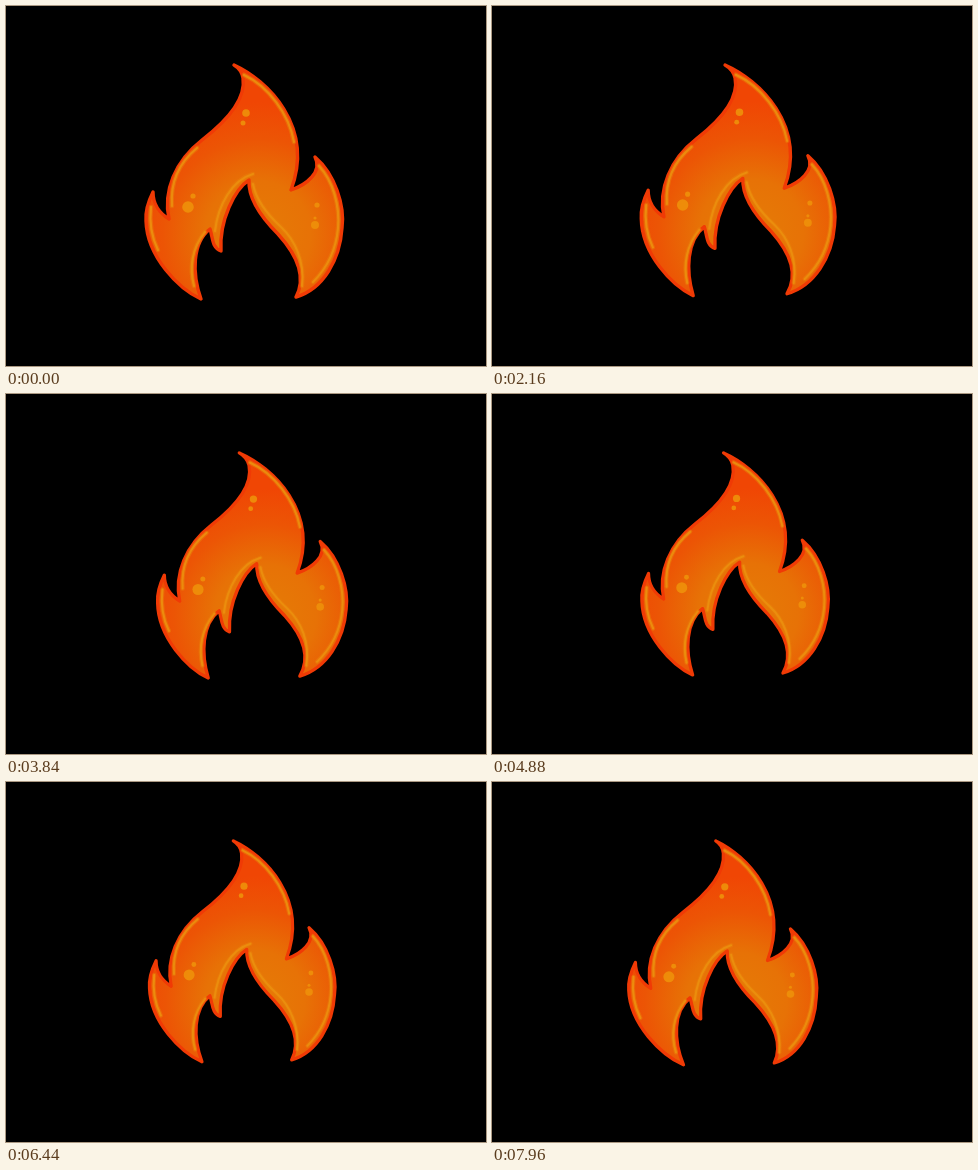
These frames come from a looping animation (480x360 px, 8000 ms). An HTML page:

```html
<!DOCTYPE html>
<html lang="en">
<head>
<meta charset="utf-8">
<title>Flame</title>
<style>
  html, body { margin: 0; width: 100%; height: 100%; overflow: hidden; background: #000; }
  svg { display: block; width: 100vw; height: 100vh; }
  path { fill: none; stroke-linecap: round; stroke-linejoin: round; }
</style>
</head>
<body>
<svg viewBox="0 0 480 360">
  <defs>
    <radialGradient id="heat" gradientUnits="userSpaceOnUse" cx="252" cy="228" r="132">
      <stop offset="0" stop-color="#e57c06"/>
      <stop offset=".4" stop-color="#e77206"/>
      <stop offset=".72" stop-color="#ec5505"/>
      <stop offset="1" stop-color="#f04604"/>
    </radialGradient>
  </defs>
  <g id="flame"></g>
</svg>
<script>
const LOOP = 8000, CX = 238, TOP = 57;
const flame = document.getElementById('flame');
const heat = document.getElementById('heat');

const BODY = `M228 59 C261 74 309 120 285 184 C300 179 317 166 309 151
  C329 168 339 200 336 222 C334 254 317 283 290 291 C300 272 292 250 272 228
  C255 211 242 192 243 174 C229 183 213 214 215 245 C206 242 207 232 204 223
  C186 237 186 268 195 293 C173 283 141 251 140 215 C139 203 143 194 147 186
  C147 197 153 207 163 213 C157 185 169 155 196 134 C222 114 240 92 237 72
  C236 66 233 62 228 59 Z`;

const GLOWS = [
  'M238 69 C262 80 283 108 288 136',
  'M166 200 C164 174 174 156 191 142',
  'M145 201 C143 218 146 232 152 244',
  'M188 280 C183 262 186 242 199 226',
  'M209 225 C212 199 226 174 247 168',
  'M247 178 C250 194 263 210 275 221 C289 234 299 256 296 280',
  'M313 160 C327 175 334 200 332 222 C330 245 321 262 307 276'
];

const DOTS = [
  [240, 107, 3.8], [237, 117, 2.5],
  [182, 201, 5.8], [187, 190, 2.6],
  [311, 199, 2.6], [309, 212, 1.6], [309, 219, 4]
];

// time, sideways sway, scale
const KEYS = [
  [0, 0, 1], [1000, 4.5, .995], [2160, 7.9, .986], [3840, 7.9, .962],
  [4880, 4.9, .949], [6440, -2, .944], [7960, -7.5, .957]
];

function add(tag, attrs) {
  const el = document.createElementNS('http://www.w3.org/2000/svg', tag);
  for (const name in attrs) el.setAttribute(name, attrs[name]);
  return flame.appendChild(el);
}

const paths = [];
function addPath(d, attrs) {
  paths.push({ d, el: add('path', attrs) });
}

addPath(BODY, { style: 'fill:url(#heat)', stroke: '#f03a05', 'stroke-width': 3.4 });
for (const d of GLOWS) {
  addPath(d, { stroke: '#ea800a', 'stroke-width': 4.5, opacity: .5 });
  addPath(d, { stroke: '#ec900e', 'stroke-width': 2.2, opacity: .9 });
}
const dots = DOTS.map(([x, y, r]) => ({
  x, y, el: add('circle', { cy: y, r, fill: '#ee8f0a', opacity: .92 })
}));

function slope(i, c) {
  const a = KEYS[Math.max(i - 1, 0)], b = KEYS[Math.min(i + 1, KEYS.length - 1)];
  return (b[c] - a[c]) / (b[0] - a[0]);
}

// smooth cubic through the keys
function sample(t, c) {
  let i = 0;
  while (i < KEYS.length - 2 && t > KEYS[i + 1][0]) i++;
  const a = KEYS[i], b = KEYS[i + 1], span = b[0] - a[0];
  const u = (t - a[0]) / span, v = 1 - u;
  return a[c] * v * v * (1 + 2 * u) + b[c] * u * u * (1 + 2 * v)
    + span * u * v * (slope(i, c) * v - slope(i + 1, c) * u);
}

// the middle sways more than the tip and the feet
const bend = y => 1 - .31 * ((y - 180) / 115) ** 4;

function draw(t) {
  const scale = sample(t, 2), sway = sample(t, 1) / scale;
  const warp = (x, y) => x + sway * bend(y);
  flame.setAttribute('transform',
    `translate(${CX} ${TOP}) scale(${scale}) translate(${-CX} ${-TOP})`);
  heat.setAttribute('gradientTransform', `translate(${sway} 0)`);
  for (const { d, el } of paths) {
    el.setAttribute('d', d.replace(/(\d+) (\d+)/g,
      (_, x, y) => warp(+x, +y).toFixed(2) + ' ' + y));
  }
  for (const { x, y, el } of dots) el.setAttribute('cx', warp(x, y));
}

const start = performance.now();
function tick() {
  draw((performance.now() - start) % LOOP);
  requestAnimationFrame(tick);
}
tick();
</script>
</body>
</html>
```
